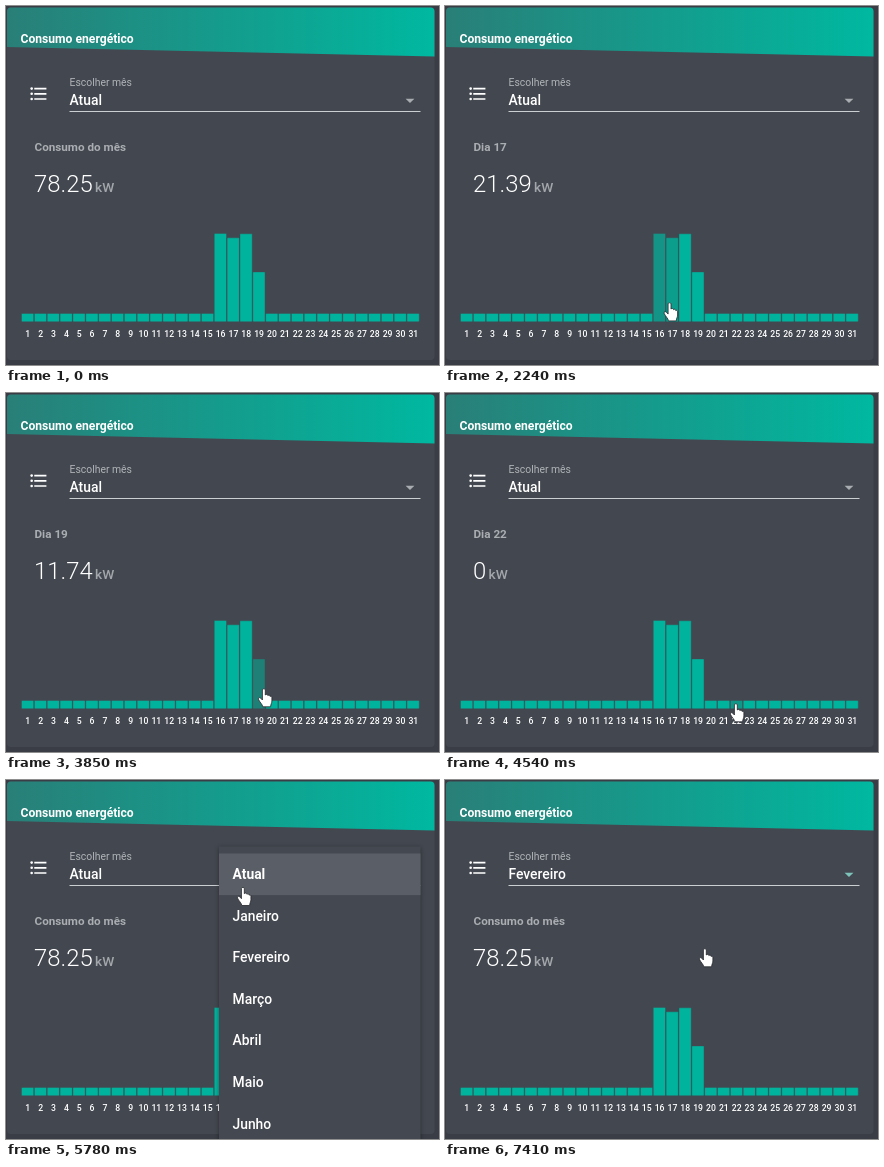
An HTML page that plays this animation: 433 by 359 pixels, repeating every 8 s.

```html
<!DOCTYPE html>
<html lang="pt">
<head>
<meta charset="utf-8">
<title>Consumo energético</title>
<style>
  html, body { margin: 0; width: 100%; height: 100%; overflow: hidden; background: #3a3d45; }
  svg { display: block; width: 433px; height: 359px; font-family: Roboto, sans-serif; }
  .ticks { font-size: 8.67px; font-weight: 500; text-anchor: middle; fill: #fff; }
  .item { font-size: 13.87px; font-weight: 450; fill: #fff; }
  #panel { filter: drop-shadow(0 1px 2px rgba(0, 0, 0, .4)); }
</style>
</head>
<body>
<svg viewBox="0 0 433 359">
  <defs>
    <linearGradient id="head">
      <stop offset="0" stop-color="#297f78"/>
      <stop offset="1" stop-color="#00b8a0"/>
    </linearGradient>
    <clipPath id="card"><rect x="1" y="1.5" width="427.5" height="352.5" rx="4"/></clipPath>
    <clipPath id="field"><rect x="63.5" y="70" width="351" height="35.5"/></clipPath>
    <clipPath id="row"><rect x="213" y="156.7" width="201.5" height="41.6"/></clipPath>
  </defs>

  <rect width="433" height="359" fill="#3a3d45"/>
  <g clip-path="url(#card)">
    <rect width="433" height="359" fill="#434850"/>
    <path d="M1 1H429V50.5L1 41Z" fill="url(#head)"/>
  </g>
  <text x="14.5" y="37" font-size="12.13" font-weight="700" fill="#fff">Consumo energético</text>

  <g transform="translate(22.2 77.4) scale(.867)" fill="#fff">
    <path d="M7 5h14v2H7zM7 11h14v2H7zM7 17h14v2H7z"/>
    <circle cx="4" cy="6" r="1.5"/><circle cx="4" cy="12" r="1.5"/><circle cx="4" cy="18" r="1.5"/>
  </g>

  <text id="label" x="63.5" y="79.8" font-size="10.4"></text>
  <text id="choice" class="item" x="63.5" y="99"></text>
  <path id="arrow" d="M399.6 92.7h8.8l-4.4 4.4z"/>
  <rect x="63.5" y="105" width="351" height="1" fill="#cccfd1"/>
  <rect id="focus" y="104" height="2" fill="#00b39c"/>
  <g clip-path="url(#field)"><circle id="ripple" fill="#fff"/></g>

  <text id="title" x="28.5" y="145" font-size="11.7" font-weight="700" fill="#aaadb1"></text>
  <text x="28" y="186" font-size="23.9" font-weight="350" fill="#fff"><tspan id="value"></tspan><tspan dx="2.3" font-size="13.7" font-weight="500" fill="#a3a6ab">kW</tspan></text>
  <g id="bars" fill="#00b39c" stroke="#434850" stroke-opacity=".5" stroke-width=".8"></g>
  <g id="ticks" class="ticks"></g>

  <g id="panel">
    <rect x="213" y="66.5" width="201.5" height="310" fill="#444850"/>
    <rect id="active" x="213" width="201.5" height="41.6" fill="#5a5e66"/>
    <g clip-path="url(#row)"><circle id="rowRipple" fill="#fff"/></g>
    <g id="items" class="item"></g>
  </g>

  <circle id="press" r="10.5" fill="#cfc62f" opacity=".75"/>
  <g id="cursor" fill="#fff" stroke="#22252a" stroke-width=".8" stroke-linejoin="round">
    <path id="hand" d="M-1.6.8C-1.6-.6 1.3-.6 1.3.8V6C1.8 5 3.8 5.2 3.9 6.6 4.5 5.8 6 6.2 6.1 7.5 6.7 6.9 7.9 7.4 7.9 8.7V12C7.9 14 6.8 15 6.6 17.8H-1.2C-1.4 15.5-4.5 13-5.6 10.2-6 8.8-4.2 7.8-3 9.4L-1.6 11Z"/>
    <path id="pointer" d="M0 0V15L3.5 11.8 6 17.5 8.3 16.5 5.8 11H10.5Z"/>
  </g>
</svg>

<script>
const LOOP = 8000, FPS = 13, FADE = 300, SAMPLES = 15;
const DAYS = 31, LEFT = 15.5, PITCH = 12.85, BASE = 315.7;
const USAGE = { 16: 22.6, 17: 21.39, 18: 22.52, 19: 11.74 };
const MONTHS = ['Atual', 'Janeiro', 'Fevereiro', 'Março', 'Abril', 'Maio', 'Junho'];
const ROW = 41.6, ROW_TOP = 73.5;
const ENTER = 1068, OPEN = 5080, PICK = 7090;

// cursor stops: time, x, y
const PATH = [
  [1070, 394, 314], [1560, 213, 300], [2040, 213, 300], [2310, 225, 297],
  [2500, 225, 297], [2850, 240, 290], [3040, 240, 290], [3310, 251, 294],
  [3780, 251, 294], [3840, 258, 296], [3880, 258, 296], [4240, 285, 303],
  [4350, 285, 303], [4540, 291, 311], [4740, 291, 311], [5080, 193, 93],
  [5320, 193, 93], [5760, 236, 105], [6400, 260, 168], [6460, 260, 169]
];

const $ = id => document.getElementById(id);
const set = (el, attrs) => { for (const k in attrs) el.setAttribute(k, attrs[k]); };
const add = (parent, tag, attrs, text = '') => {
  const el = document.createElementNS('http://www.w3.org/2000/svg', tag);
  set(el, attrs);
  el.textContent = text;
  return parent.appendChild(el);
};
const ramp = (t, a, b) => Math.min(1, Math.max(0, (t - a) / (b - a)));
const smooth = p => p * p * (3 - 2 * p);
const easeOut = p => 1 - (1 - p) ** 3;

const barLeft = day => LEFT + (day - 1) * PITCH;
const barHeight = day => 8.2 + 80 * (USAGE[day] || 0) / 22.6;

const bars = [], items = [];
for (let day = 1; day <= DAYS; day++) {
  const h = barHeight(day), x = barLeft(day);
  bars.push(add($('bars'), 'rect', { x, y: BASE - h, width: PITCH - .6, height: h, rx: .6 }));
  add($('ticks'), 'text', { x: x + 6.3, y: 331 }, day);
}
MONTHS.forEach((name, i) =>
  items.push(add($('items'), 'text', { x: 226.5, y: 99 + i * ROW }, name)));
$('label').textContent = 'Escolher mês';

function cursorAt(t) {
  let i = 0;
  while (i < PATH.length - 2 && t >= PATH[i + 1][0]) i++;
  const [t0, x0, y0] = PATH[i], [t1, x1, y1] = PATH[i + 1];
  const p = easeOut(ramp(t, t0, t1));
  return [x0 + (x1 - x0) * p, y0 + (y1 - y0) * p];
}

// day whose bar lies under the cursor, 0 for none
function dayAt(t) {
  if (t < ENTER || t > 5000) return 0;
  const [x, y] = cursorAt(t);
  const day = Math.floor((x - LEFT) / PITCH) + 1;
  const inside = day >= 1 && day <= DAYS && x - barLeft(day) < PITCH - .6;
  return inside && y < BASE && y > BASE - barHeight(day) ? day : 0;
}

function drawBars(t) {
  const day = dayAt(t), held = {};
  for (let k = 0; k < SAMPLES; k++) {
    const d = dayAt(t - k * FADE / SAMPLES);
    held[d] = (held[d] || 0) + 1 / SAMPLES;
  }
  bars.forEach((bar, i) => set(bar, { opacity: 1 - .48 * (held[i + 1] || 0) }));
  $('title').textContent = day ? 'Dia ' + day : 'Consumo do mês';
  $('value').textContent = day ? USAGE[day] || 0 : 78.25;
}

function drawField(t) {
  const picked = t >= PICK;
  const width = 351 * smooth(ramp(t, 5190, 5490));
  $('choice').textContent = MONTHS[picked ? 2 : 0];
  set($('label'), { fill: t > 5130 && t < 5680 ? '#00b39c' : '#b0b3b7' });
  set($('arrow'), { fill: picked ? '#7fc4bb' : '#a9acb0' });
  set($('focus'), { x: 239 - width / 2, width, opacity: 1 - ramp(t, 5620, 5750) });
  set($('ripple'), {
    cx: 193, cy: 93, r: Math.max(0, t - OPEN) * .278,
    opacity: .25 * (1 - ramp(t, 5300, 5530))
  });
}

function drawPanel(t) {
  const picked = t >= PICK, chosen = picked ? 2 : 0;
  const grow = easeOut(ramp(t, 5370, 5540));
  set($('panel'), {
    transform: `translate(0 ${66.5 * (1 - grow)}) scale(1 ${grow})`,
    opacity: 1 - ramp(t, 7260, 7370),
    visibility: grow > 0 && t < 7370 ? 'visible' : 'hidden'
  });
  set($('active'), { y: ROW_TOP + chosen * ROW });
  set($('items'), { opacity: ramp(t, 5570, 5730) });
  items.forEach((item, i) => set(item, { 'font-weight': i === chosen ? 700 : 450 }));
  set($('rowRipple'), { cx: 260, cy: 169, r: Math.max(0, t - PICK) * .278, opacity: .12 });
}

function drawCursor(t) {
  const [x, y] = cursorAt(t);
  const hand = dayAt(t) > 0 || t > 5000;
  const pressed = (t >= OPEN && t < 5320) || (t >= PICK && t < 7320);
  set($('cursor'), { transform: `translate(${x} ${y})`, visibility: t < ENTER ? 'hidden' : 'visible' });
  set($('hand'), { display: hand ? 'inline' : 'none' });
  set($('pointer'), { display: hand ? 'none' : 'inline' });
  set($('press'), { cx: x, cy: y, visibility: pressed ? 'visible' : 'hidden' });
}

function draw(ms) {
  const t = Math.floor(ms * FPS / 1000 + .12) * 1000 / FPS;
  drawBars(t);
  drawField(t);
  drawPanel(t);
  drawCursor(t);
}

const start = performance.now();
function tick() {
  draw((performance.now() - start) % LOOP);
  requestAnimationFrame(tick);
}
tick();
</script>
</body>
</html>
```
